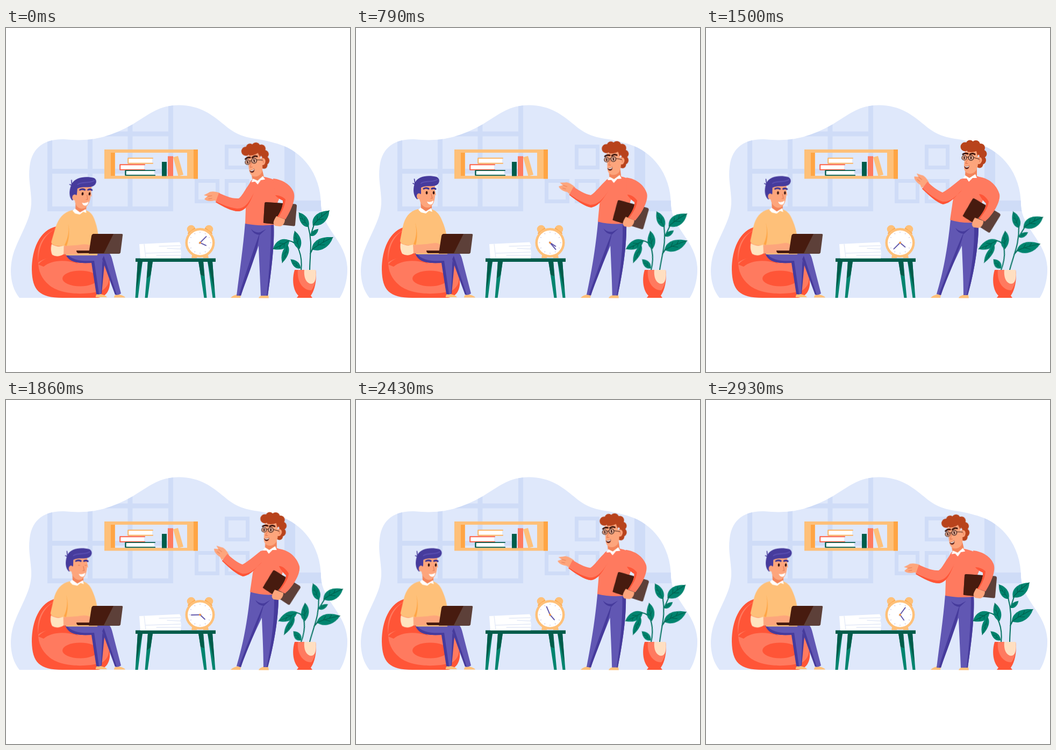
These frames come from a looping animation (640x640 px, 3 s). An HTML page without scripts:

```html
<!DOCTYPE html>
<html lang="en">
<head>
<meta charset="utf-8">
<title>Office chat</title>
<style>
html, body { margin: 0; width: 100%; height: 100%; overflow: hidden; background: #fff; }
svg { display: block; width: 100%; height: 100%; }

/* --a is the pose leaning left, --b the pose leaning right */
.morph, .sway, .late { animation: morph 3s ease-in-out infinite; }
.morph { d: var(--a); }
.sway { animation-name: sway; }
.late { animation-name: late; }
@keyframes morph { 0%, 100% { d: var(--a); } 50%, 59% { d: var(--b); } }
@keyframes sway { 0%, 100% { transform: var(--a); } 50%, 59% { transform: var(--b); } }
@keyframes late { 0%, 100% { transform: var(--a); } 59% { transform: var(--b); } }

.lean { transform-origin: 130px 420px; animation: lean 3s ease-in-out infinite; }
@keyframes lean {
  0% { transform: translateY(2px) skewX(-5.5deg); }
  27%, 41% { transform: none; }
  57%, 100% { transform: translateY(.5px) skewX(-2deg); }
}
.eyes { animation: blink 3s step-end infinite; }
@keyframes blink { 0%, 19%, 65% { opacity: 1; } 14.2%, 59.6% { opacity: 0; } }
.fingers { animation: tap .3s ease-in-out infinite alternate; }
@keyframes tap { to { transform: translateY(-1.5px); } }

.hand { transform-origin: 361px 399.5px; animation: 3s linear infinite; }
.minute { animation-name: minute; }
.hour { animation-name: hour; }
@keyframes minute { from { transform: rotate(45deg); } to { transform: rotate(405deg); } }
@keyframes hour { from { transform: rotate(115deg); } to { transform: rotate(145deg); } }

.line { fill: none; stroke-linecap: round; stroke-linejoin: round; }
.skin { fill: #fda57c; }
.shade { fill: #f3845a; }
.coral { fill: #ff7a5f; }
.red { fill: #ff5537; }
.sand { fill: #fec079; }
.orange { fill: #ffa544; }
.violet { fill: #6157b3; }
.indigo { fill: #463b9c; }
.teal { fill: #00846f; }
.pine { fill: #005c4a; }
.brown { fill: #5d4039; }
.cocoa { fill: #471b0f; }
.rust { fill: #b8431c; }
.white { fill: #fff; }
</style>
</head>
<body>
<svg viewBox="0 0 640 640">
<defs>
  <path id="blob" d="M25 502C5 478 5 438 18 408C34 370 48 350 47 320C46 295 41 280 44 258C48 220 75 206 108 207C150 211 185 208 236 179C270 158 285 144 322 143.5C362 144 384 162 406 180C440 210 462 202 500 214C550 226 586 270 586 330C588 372 632 396 635 445C636 470 628 492 621 502Z"/>
  <clipPath id="wall"><use href="#blob"/></clipPath>
  <g id="leaf">
    <path class="teal" d="M0 0C7-12 24-12 40 0C28 11 10 12 0 0Z"/>
    <path d="M0 0Q20-2 40 0M12-1l5-5M22-1l5-4M15 0l7 4" class="line" stroke="#005c4a"/>
  </g>
  <g id="book">
    <path class="white" d="M2 2H46V10H2Z"/>
    <path class="line" stroke="currentColor" stroke-width="2" d="M47 1.200H1.200V10.800H47"/>
  </g>
</defs>

<!-- Room -->
<use href="#blob" fill="#dfe8fb"/>
<g clip-path="url(#wall)" fill="none" stroke="#cfdcf7">
  <path stroke-width="9" d="M81.500 140V341M156.500 140V337M231 140V337M306.500 140V341M77 197H307M77 266.500H307M77 336.500H307"/>
  <path stroke-width="7" d="M410.500 220.500h39v39h-39zM354.500 284.500h39v38h-39zM410.500 284.500h39v38h-39z"/>
  <path stroke-width="20" d="M528 190V331H600"/>
</g>

<!-- Shelf -->
<path class="sand" fill-rule="evenodd" d="M183 226H357V280.500H183ZM203 232V275H337V232Z"/>
<path class="orange" d="M195 232h7.500v43h-7.500zM349 226h8v54.500h-8z"/>
<use href="#book" x="226" y="241" color="#fdb562"/>
<use href="#book" x="211" y="253" color="#ff6146"/>
<use href="#book" transform="translate(221 264) scale(1.19 .92)" color="#005c4a"/>
<path class="pine" d="M290 249h9v26.500h-9z"/>
<path class="coral" d="M301 238.500h10v37h-10z"/>
<path class="sand" d="M311 240.500L320 238L330 273L320.500 275.500Z"/>

<!-- Bean bag -->
<path class="red" d="M94 369C62 376 48 412 48 450C49 488 62 502 105 502H170C186 501 195 488 193 468C190 440 150 410 118 400Z"/>
<path class="coral" d="M94 373C70 384 60 408 60 436C78 424 105 423 130 434L188 440C195 465 193 480 178 489C140 499 98 494 80 478C66 466 60 452 60 436C56 405 68 384 94 373Z"/>
<path class="red" d="M60 440C72 425 98 420 122 428L134 438C108 430 84 432 70 444Z"/>
<ellipse class="red" cx="138" cy="466" rx="33" ry="14.500"/>

<!-- Seated man -->
<path class="sand" d="M167 501C166 495 173 493 176 495Q186 497 188 501ZM201 501.500C201 496 207 494 211 496Q220 498 222 501.500Z"/>
<path class="indigo" d="M110 418C114 434 130 439 159 437L168 495Q173 497 178 494L184 430L172 416Z"/>
<path class="violet" d="M112 418C122 433 140 434 164 433L173 495L177 494L180 418Z"/>
<path class="violet" d="M150 416H186C194 418 196 424 198 432L214 494Q208 498 203 496L181 436C176 426 164 422 150 422Z"/>
<path class="indigo" d="M179 430L182 424L206 496L203 496Z"/>
<g class="lean">
  <path class="sand" d="M115 337C99 341 91 352 87 370L82 396C82 402 92 405 104 404L112 421H170C172 400 169 378 160 358C154 343 147 339 140 337Z"/>
  <path class="orange" d="M110 362C114 378 112 390 107 402L111 404C115 390 114 374 110 362Z"/>
  <path class="shade" d="M120 322H141V336Q132 346 121 336Z"/>
  <path class="white" d="M116 338L120 334L130 341L140 335L142 342L136 340L130 345L121 343Z"/>
  <path class="skin" d="M118 290V318C120 330 128 335 135 334C143 332 147 322 147 310L149 312L147 302V288Z"/>
  <path class="indigo" d="M114 319C105 312 106 296 110 287C116 275 135 273 150 277C158 281 155 291 148 293C139 296 130 292 121 297V308L118 312Z"/>
  <path class="line" stroke="#5b50b2" stroke-width="2" d="M121 289C128 283 142 288 151 282"/>
  <path class="line" stroke="#463b9c" stroke-width="1.600" d="M112 292L106 289M110 290L108.500 281"/>
  <ellipse class="skin" cx="117" cy="313" rx="4" ry="5.500"/>
  <path class="line" stroke="#3b3190" stroke-width="3.200" d="M126 299Q130 296.500 135 299M141 299Q145 297 148 299.500"/>
  <path class="line" stroke="#de7650" stroke-width="1.100" d="M130.500 307h3M143 307h3M140 309L142 317H139"/>
  <g class="eyes" fill="#3a1712">
    <ellipse cx="131.500" cy="306.500" rx="1.800" ry="3"/>
    <ellipse cx="144.500" cy="306.500" rx="1.700" ry="3"/>
  </g>
  <path class="white" d="M132 323Q139 325 144 321Q143.500 328.500 138.500 328.500Q134 328 132 323Z"/>
  <path class="skin" d="M102 404L132 402Q148 398 157 404L156 416Q130 420 104 419Z"/>
  <path class="skin fingers" d="M140 403Q150 398 157 405L155 412H143Z"/>
  <path d="M83 400Q94 407 106 403L107 419Q96 426 86 420Q81 411 83 400Z" fill="#ffe4bf"/>
</g>
<path class="brown" d="M163 383H215Q218 383 217 386L213 418Q212 420 210 420H154Z"/>
<path class="cocoa" d="M163 383H200L182 419H154L159 387Q160 383 163 383ZM131 414H156L155 419H134Q131 418 131 414Z"/>

<!-- Table -->
<path class="teal" d="M245 434h9L245.500 502h-5zM264 434h9L263.500 502h-5zM358 434h9L373.500 502h-5zM375 434h9L389.500 502h-5z"/>
<path class="pine" d="M241 428.500H390V435H241ZM245 434h9L242 490zM264 434h9L269 460L262 466zM358 434h9l2 28-7-3zM375 434h9L388 490z"/>
<path class="white" d="M248 402L323 398.500L326 405L324 410L326 417L325 428.500H250Z"/>
<path class="line" stroke="#e3e9f7" stroke-width="1.300" d="M257 402L260 427M325 405L285 406M324 411L300 410M260 419L325 417M325 423L280 423"/>

<!-- Alarm clock -->
<g class="sand">
  <path d="M347 418L345 428H355L357 422ZM375 418L377 428H367L365 422Z"/>
  <circle cx="344.500" cy="374.500" r="7.800"/><circle cx="377.500" cy="374.500" r="7.800"/>
</g>
<path class="line" stroke="#ffa544" stroke-width="2" d="M339 382L351 373M383 382L371 373"/>
<circle class="sand" cx="361" cy="399.500" r="27.500"/>
<circle class="white" cx="361" cy="399.500" r="23"/>
<circle cx="361" cy="399.500" r="19.500" fill="none" stroke="#aaa6d2" stroke-width="2" pathLength="120" stroke-dasharray=".8 9.2" stroke-dashoffset=".4"/>
<path class="line hand minute" stroke="#463b9c" stroke-width="1.700" d="M361 401V383"/>
<path class="line hand hour" stroke="#463b9c" stroke-width="1.700" d="M361 400V387"/>
<circle cx="361" cy="399.500" r="2" fill="#f59b48"/>

<!-- Standing man -->
<path class="sand" d="M418 502C421 498 427 497 430 495L437 497L436 502ZM470 502.500C472 498 476 498 479 496L488 497L489 502.500Z"/>
<path class="violet morph" style="--a:path('M445 362L498 362C500 400 494 450 487 498L474 498C473 470 471 435 470 405C458 440 446 470 437 498L429 498C435 450 441 410 445 362Z');--b:path('M455 356L507 360C508 400 499 455 487 497L479 497C479 465 477 430 476 405C462 435 447 465 437 497L429 495C441 455 449 415 455 356Z')"/>
<g class="indigo">
  <path class="morph" style="--a:path('M472 381C468 420 448 465 437 498L433 498C446 455 460 415 472 381Z');--b:path('M480 379C472 415 450 460 437 497L433 496C449 455 465 412 480 379Z')"/>
  <path class="morph" style="--a:path('M498 366C500 400 494 450 487 498L485 498C490 450 493 410 493 366Z');--b:path('M507 362C508 400 499 455 487 497L485 497C494 450 500 410 499 364Z')"/>
  <path class="morph" style="--a:path('M456 374Q464 382 473 380L484 374L472 385Q460 384 456 374Z');--b:path('M464 372Q472 380 481 378L492 372L480 383Q468 382 464 372Z')"/>
</g>
<path class="coral morph" style="--a:path('M457 283C450 290 448 310 446 335L445 364Q470 369 499 366C498 345 502 332 508 318L512 288C500 282 490 279 481 277Z');--b:path('M474 281C464 292 461 310 458 330L454 357Q480 365 507 361C508 345 511 330 517 315L522 284C512 278 505 275 500 275Z')"/>

<g class="sway" style="transform-origin:394px 315px;--a:none;--b:translate(13px,-23px) rotate(46deg)">
  <path class="skin" d="M398 307C389 304 381 303 376 307L368 311L375 313L369 318C372 322 380 323 388 321L394 323Z"/>
  <path class="line" stroke="#e67d55" d="M376 313L383 312M377 318L383 317"/>
</g>
<path class="coral morph" style="--a:path('M460 282C447 294 441 312 433 317C420 318 408 312 396 307L390 324C405 333 422 342 434 341C450 338 455 320 462 305Z');--b:path('M474 281C460 292 448 302 440 306C430 302 420 294 412 286L402 299C415 312 430 325 441 328C458 325 466 310 476 302Z')"/>
<path class="red morph" style="--a:path('M462 305C452 325 445 336 430 336C414 334 402 328 391 323L390 324C405 333 422 342 434 341C450 338 455 320 462 305Z');--b:path('M476 302C463 315 454 324 440 323C426 318 414 308 403 298L402 299C415 312 430 325 441 328C458 325 466 310 476 302Z')"/>

<g class="late" style="transform-origin:510px 346px;--a:none;--b:translate(3px,3px) rotate(28deg)">
  <path class="brown" d="M484 324L538 327.500Q541 328 541 331L538 366Q538 369 535 368.500L481 363Q478 363 479 360L481 327Q481 324 484 324Z"/>
  <path class="cocoa" d="M484 324L518 326.200L500 365L481 363Q478 363 479 360L481 327Q481 324 484 324Z"/>
</g>
<path class="skin late" style="--a:none;--b:translate(-3px,3px)" d="M503 350L519 356C519 364 513 370 509 369L501 368C495 364 498 358 503 350Z"/>
<path class="coral morph" style="--a:path('M497 280C515 282 530 292 535 305C540 318 530 340 520 356L505 351C512 340 516 330 515 321C508 318 503 314 500 308Z');--b:path('M508 277C526 279 541 292 546 309C549 322 534 348 519 360L507 354C516 342 521 334 521 326C516 322 510 314 507 306Z')"/>
<path class="red morph" style="--a:path('M501 311C507 311 516 314 520 319C519 332 512 344 507 352L505 351C512 340 516 330 515 321C508 318 503 314 501 311Z');--b:path('M508 309C516 309 523 317 526 323C525 335 515 347 509 355L507 354C516 342 521 334 521 326C516 322 510 314 508 309Z')"/>

<g class="sway" style="transform-origin:490px 274px;--a:translate(-23px,5px) rotate(-13deg);--b:translateX(1px)">
  <path class="shade" d="M482 258H503V276Q491 286 481 276Z"/>
  <g class="rust">
    <circle cx="481" cy="221" r="8.500"/><circle cx="490" cy="216" r="7.500"/>
    <circle cx="501" cy="217" r="8"/><circle cx="510" cy="223" r="8"/>
    <circle cx="514" cy="234" r="7.500"/><circle cx="512" cy="246" r="8"/>
    <circle cx="508" cy="254" r="6.500"/><circle cx="497" cy="228" r="12"/>
  </g>
  <path class="skin" d="M481 229Q493 233 502 229L505 241C510 238 515 244 511 250Q509 254 505 253C504 264 499 271 490 271C483 271 479 266 479 258Z"/>
  <path class="line" stroke="#3f170e" stroke-width="3" d="M477 235Q481 232 486 234M490 235Q495 232 499 235"/>
  <g fill="#dba48c" stroke="#45261d" stroke-width="1.200">
    <circle cx="479.500" cy="241.500" r="4.500"/><circle cx="492" cy="241.500" r="4.800"/>
    <path fill="none" d="M484 241Q486 239 487 241M497 241L508 244"/>
  </g>
  <path d="M478.500 239h2v5h-2zM491 239h2v5h-2z" fill="#3a1712"/>
  <path class="line" stroke="#e67d55" stroke-width="1.300" d="M486 244L482 252H486M506 245Q510 244 508 249"/>
  <path d="M479.500 257Q485 259 489 255.500Q488.500 262.500 484 262.500Q480 262 479.500 257Z" fill="#5b1f17"/>
  <path class="white" d="M480 257.200Q485 259 488.800 256Q488 259.500 484 259.500Q481 259.500 480 257.200Z"/>
</g>
<path class="white sway" style="transform-origin:490px 278px;--a:translate(-22px,5px) rotate(-9deg);--b:none" d="M478 280L482 274L490 279L501 272L504 279L496 279L489 286L485 280Z"/>

<!-- Plant -->
<g class="sway" style="transform-origin:549px 450px;--a:none;--b:skewX(-15deg)">
  <path class="line" stroke="#00705e" stroke-width="2" d="M549 452C552 425 544 396 525 396"/>
  <use href="#leaf" transform="translate(527 395) rotate(152) scale(.86 1)"/>
  <use href="#leaf" transform="translate(524 404) rotate(107) scale(.86 .65)"/>
  <use href="#leaf" transform="translate(546 411) rotate(-105) scale(.86 .8)"/>
  <use href="#leaf" transform="translate(548 447) rotate(-138) scale(.62)"/>
</g>
<g class="sway" style="transform-origin:565px 450px;--a:none;--b:rotate(14deg)">
  <path class="line" stroke="#00705e" stroke-width="2" d="M565 454C565 420 571 400 562 368M566 420L571 410M567 385L573 366"/>
  <use href="#leaf" transform="translate(571 367) rotate(-42) scale(1.020 1.150)"/>
  <use href="#leaf" transform="translate(563 370) rotate(-124) scale(.81)"/>
  <use href="#leaf" transform="translate(567 387) rotate(-43) scale(.48)"/>
  <use href="#leaf" transform="translate(569 412) rotate(-30) scale(1.130)"/>
</g>
<path class="red" d="M537 450H576C579 472 573 490 567 498L570 502H541L544 498C535 489 531 470 537 450Z"/>
<path class="coral" d="M543 450H576C578 470 573 482 568 488C552 488 541 472 543 450Z"/>
<path d="M555 450H576C578 464 576 478 565 475.500C556 472 554 460 555 450Z" fill="#ffdfc1"/>
</svg>
</body>
</html>
```
